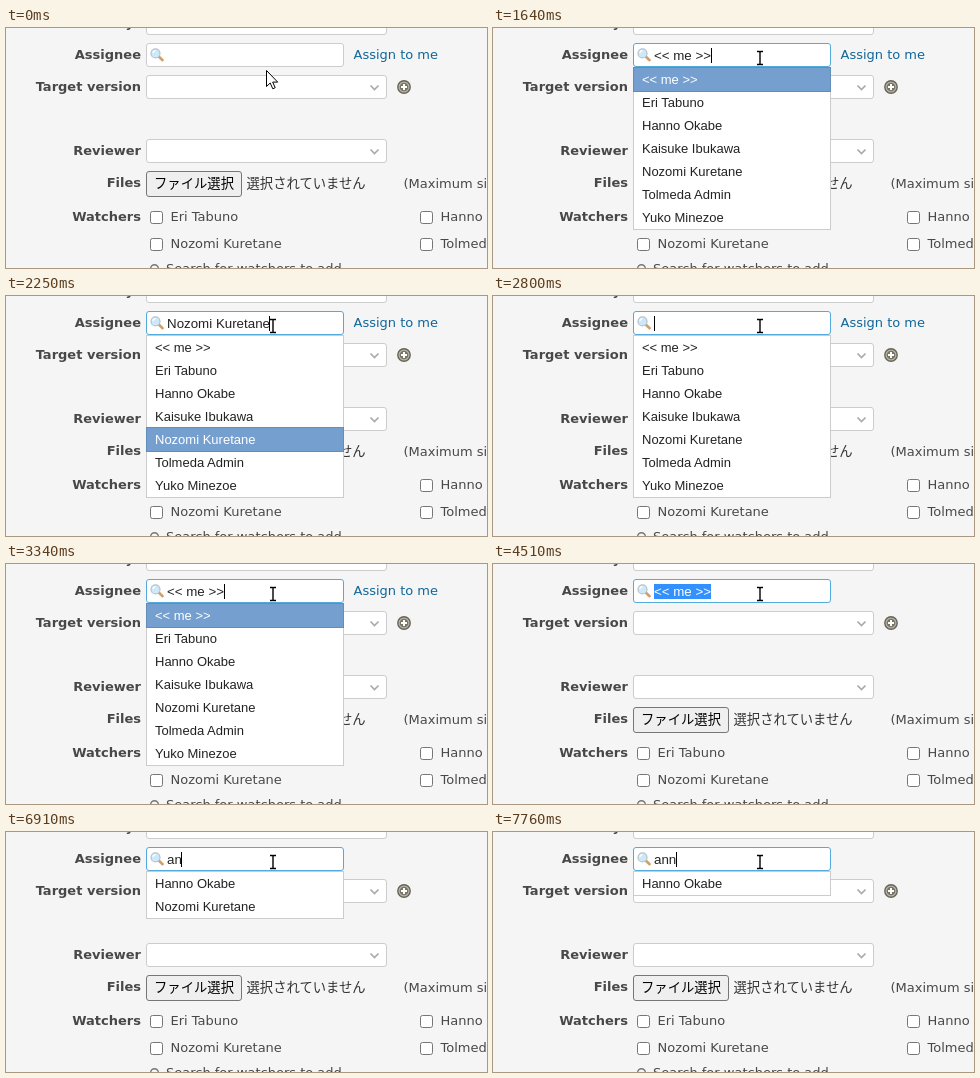
An HTML page that plays this animation: 481x240 px, repeating every 7990 ms.

```html
<!DOCTYPE html>
<html lang="en">
<head>
<meta charset="utf-8">
<title>Searchable assignee field</title>
<style>
  html, body { margin: 0; width: 100%; height: 100%; overflow: hidden; background: #f5f5f5; }
  svg { display: block; width: 100vw; height: 100vh; }
  text { font: 13px "DejaVu Sans", sans-serif; fill: #484848; white-space: pre; }
  .label { font-weight: bold; text-anchor: end; }
  .link { fill: #169; }
  .cjk { font: 13.333px "Noto Sans CJK JP", "Noto Sans CJK", sans-serif; fill: #333; }
  .input { font: 13.333px "Liberation Sans", Arial, sans-serif; fill: #222; }
  .item { font: 13px "Liberation Sans", Arial, sans-serif; fill: #222; }
  .item.active { fill: #fff; }
  .field { fill: #fff; stroke: #ccc; }
  .focus { stroke: #5ad; }
  .box { fill: #fff; stroke: #767676; }
  .active-row { fill: #759fcf; stroke: #628db6; }
</style>
</head>
<body>
<svg id="stage" viewBox="0 0 481 240" xmlns="http://www.w3.org/2000/svg">
  <rect width="481" height="240" fill="#f5f5f5"/>
  <g id="form"></g>
  <text id="link" class="link" x="347.5" y="31">Assign to me</text>

  <g id="addIcon">
    <circle cx="398" cy="59" r="6.2" fill="#b9b5a0" stroke="#66645c" stroke-width="1.4"/>
    <circle cx="398" cy="59" r="4.3" fill="#77756a"/>
    <path d="M398 56v6M395 59h6" stroke="#fff" stroke-width="2"/>
  </g>

  <rect x="140.5" y="143.5" width="95" height="25" rx="2.5" fill="#efefef" stroke="#767676"/>
  <text class="cjk" x="148" y="160" style="fill:#000">ファイル選択</text>
  <text class="cjk" x="240.5" y="160">選択されていません</text>
  <text x="397.5" y="160">(Maximum size: 5 MB)</text>

  <circle cx="148.5" cy="240.5" r="3.8" fill="none" stroke="#777" stroke-width="1.4"/>
  <text x="160" y="245">Search for watchers to add</text>

  <rect id="field" class="field" x="140.5" y="15.5" width="197" height="23" rx="2.5"/>
  <path d="M153 28.8l3.6 3.4" stroke="#cf9f6c" stroke-width="2.6" stroke-linecap="round"/>
  <circle cx="149.5" cy="25.4" r="4.5" fill="#cde8f8" stroke="#b3c3cd" stroke-width="1.2"/>
  <path d="M147 25.2a2.6 2.6 0 0 1 2.6-2.5" fill="none" stroke="#fff" stroke-width="1.2"/>
  <rect id="selection" x="161" y="20" width="57" height="15" fill="#3390ff"/>
  <text id="value" class="input" x="161" y="32"></text>
  <rect id="caret" y="20" width="1" height="15" fill="#000"/>

  <g id="list"></g>

  <path id="arrow" d="M.5 .5v16l3.7-3.5 2.6 5.8 2.4-1.1-2.5-5.6h5z"
        fill="#fff" stroke="#000" stroke-linejoin="round"/>
  <path id="beam" d="M-3 -6.5h2.3l.7.6.7-.6H3M0 -6V6M-3 6.5h2.3l.7-.6.7.6H3"
        fill="none" stroke="#000" stroke-width="1.4"/>
</svg>
<script>
const LOOP = 7990, ROW = 23, LIST_TOP = 39, TEXT_X = 161;
const ME = "<< me >>";
const people = ["Eri Tabuno", "Hanno Okabe", "Kaisuke Ibukawa", "Nozomi Kuretane", "Tolmeda Admin", "Yuko Minezoe"];
const options = [ME, ...people];
const matching = query => options.filter(name => name.toLowerCase().includes(query));

const $ = id => document.getElementById(id);
const add = (parent, tag, attrs, text = "") => {
  const node = document.createElementNS("http://www.w3.org/2000/svg", tag);
  for (const key in attrs) node.setAttribute(key, attrs[key]);
  node.textContent = text;
  return parent.appendChild(node);
};
const show = (id, on) => $(id).setAttribute("visibility", on ? "visible" : "hidden");

function buildForm() {
  const form = $("form");
  const label = (text, y, x = 135) => add(form, "text", { class: "label", x, y }, text);
  label("Priority", -1, 128);
  label("Assignee", 31);
  label("Target version", 63);
  label("Reviewer", 127);
  label("Files", 159);
  label("Watchers", 193);

  for (const y of [-17, 47, 111]) {
    add(form, "rect", { class: "field", x: 140.5, y: y + .5, width: 240, height: 23, rx: 2.5 });
    add(form, "path", { d: `M364.5 ${y + 10.5}l4 4 4-4`, fill: "none", stroke: "#aaa", "stroke-width": 1.7 });
  }

  const watcher = (name, x, y) => {
    add(form, "rect", { class: "box", x: x + .5, y: y - 9.5, width: 12, height: 12, rx: 2 });
    add(form, "text", { x: x + 20.5, y }, name);
  };
  watcher(people[0], 144, 193);
  watcher(people[1], 414, 193);
  watcher(people[3], 144, 220);
  watcher(people[4], 414, 220);
}

// Each step changes only the listed properties of the state.
const steps = [
  [0, { arrow: [260, 42], beam: null, focus: false, caret: false, value: "", items: [], active: -1, selected: false, link: true }],
  [90, { arrow: null, beam: [263, 36] }],
  [170, { beam: [266, 32] }],
  [240, { beam: [267, 30] }],
  [320, { focus: true, caret: true }],
  [860, { caret: false }],
  [1100, { items: options }],
  [1410, { caret: true }],
  ...[1640, 1790, 1950, 2100, 2250, 2480, 2650].map((t, i) => [t, { value: options[i], active: i }]),
  [2800, { value: "", active: -1 }],
  [3180, { caret: false }],
  [3340, { value: ME, active: 0, caret: true }],
  [3810, { items: [], active: -1, link: false }],
  [4360, { caret: false }],
  [4510, { selected: true }],
  [5980, { selected: false, value: "a", caret: true }],
  [6290, { items: matching("a") }],
  [6520, { caret: false }],
  [6610, { value: "an", caret: true }],
  [6910, { items: matching("an") }],
  [7150, { caret: false }],
  [7450, { value: "ann", caret: true }],
  [7760, { items: matching("ann") }]
];

function drawList(items, active) {
  const list = $("list");
  list.replaceChildren();
  if (!items.length) return;
  const frame = (cls, y, rows) =>
    add(list, "rect", { class: cls, x: 140.5, y: y + .5, width: 197, height: rows * ROW + 1 });
  frame("field", LIST_TOP, items.length);
  if (active >= 0) frame("active-row", LIST_TOP + active * ROW, 1);
  items.forEach((name, i) =>
    add(list, "text", { class: i === active ? "item active" : "item", x: 149, y: 56 + i * ROW }, name));
}

function drawPointer(id, pos) {
  show(id, pos);
  if (pos) $(id).setAttribute("transform", `translate(${pos})`);
}

function render(state) {
  $("field").setAttribute("class", state.focus ? "field focus" : "field");
  $("value").textContent = state.value;
  $("value").style.fill = state.selected ? "#fff" : "";
  const width = state.value ? $("value").getComputedTextLength() : 0;
  $("caret").setAttribute("x", Math.floor(TEXT_X + width));
  show("caret", state.caret);
  show("selection", state.selected);
  show("link", state.link);
  drawList(state.items, state.active);
  drawPointer("arrow", state.arrow);
  drawPointer("beam", state.beam);
}

let start = null, shown = -1;
function tick(now) {
  start ??= now;
  const t = (now - start) % LOOP;
  const past = steps.filter(([at]) => at <= t);
  if (past.length !== shown) {
    shown = past.length;
    render(Object.assign({}, ...past.map(([, change]) => change)));
  }
  requestAnimationFrame(tick);
}

buildForm();
render(steps[0][1]);
requestAnimationFrame(tick);
</script>
</body>
</html>
```
